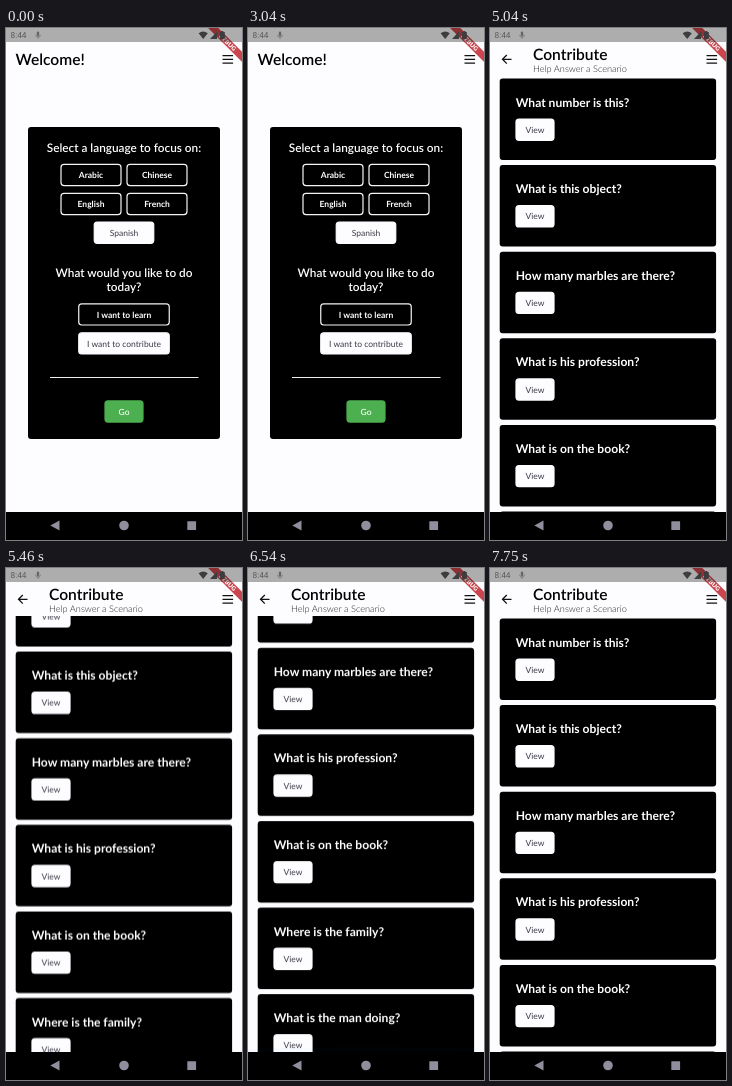
Write an HTML page that moves like this. It is 236 px wide and 512 px high and loops after 8000 ms.

```html
<!DOCTYPE html>
<html lang="en">
<head>
<meta charset="utf-8">
<title>Language app</title>
<style>
html, body { margin: 0; width: 100%; height: 100%; overflow: hidden; background: #fdfcff; }
svg { display: block; width: 236px; height: 512px; font-family: Lato, sans-serif; text-rendering: geometricPrecision; }
.mid { text-anchor: middle; }
.title { font-size: 15.6px; font-weight: 600; fill: #000; }
.subtitle { font-size: 9.2px; font-weight: 300; fill: #222; }
.ask { font-size: 11.8px; font-weight: 600; fill: #fff; }
.question { font-size: 12.1px; font-weight: 700; fill: #fff; }
.label { font-size: 8.5px; }
.line { fill: none; stroke: #111; stroke-width: 1.3; }
.page, .list, .glow { animation: 8s linear infinite; }
.page { animation-name: open; }
.list { animation-name: scroll; }
.glow { fill: #2a9fff; opacity: 0; }
.bottom { animation-name: glow-bottom; transform-origin: 118px 484px; }
.top { animation-name: glow-top; transform-origin: 118px 48px; }

@keyframes open {
  0%, 38.625% { opacity: 0; transform: translateY(128px); animation-timing-function: cubic-bezier(.4, 0, .2, 1); }
  42.375%, 100% { opacity: 1; transform: none; }
}
@keyframes scroll {
  0%, 65.625% { transform: none; animation-timing-function: cubic-bezier(.35, .25, .6, 1); }
  74.75%, 81.25% { transform: translateY(-168px); }
  83.875% { transform: translateY(-44.5px); }
  84.875%, 100% { transform: none; }
}
@keyframes glow-bottom {
  0%, 74.75% { opacity: 0; transform: scaleY(0); }
  76.6%, 77.8% { opacity: .14; transform: none; animation-timing-function: ease-out; }
  83.6%, 100% { opacity: 0; transform: scaleY(0); }
}
@keyframes glow-top {
  0%, 84.875% { opacity: 0; transform: scaleY(0); }
  86.75% { opacity: .14; transform: none; animation-timing-function: ease-out; }
  94.25%, 100% { opacity: 0; transform: scaleY(0); }
}
</style>
</head>
<body>
<svg viewBox="0 0 236 512">
  <defs>
    <path id="menu" class="line" d="M216.5 27.6h10.6M216.5 31.4h10.6M216.5 35.2h10.6"/>
  </defs>

  <g>
    <rect width="236" height="512" fill="#fdfcff"/>
    <text class="title" x="9.6" y="37.3">Welcome!</text>
    <use href="#menu"/>
    <rect x="22" y="99" width="192" height="312" rx="3"/>
    <g class="ask mid">
      <text x="118" y="124">Select a language to focus on:</text>
      <text x="118" y="249">What would you like to do</text>
      <text x="118" y="263.3">today?</text>
    </g>
    <g id="buttons"></g>
    <path d="M44 349.5h148.5" stroke="#eee"/>
  </g>

  <g class="page">
    <rect width="236" height="512" fill="#fdfcff"/>
    <g class="list" id="list"></g>
    <path class="glow bottom" d="M0 484V464Q118 438 236 464V484Z"/>
    <path class="glow top" d="M0 48V68Q118 94 236 68V48Z"/>
    <rect width="236" height="48" fill="#fdfcff"/>
    <path class="line" d="M21.5 31.3H12.8M16.8 27L12.5 31.3L16.8 35.6"/>
    <text class="title" x="43" y="32">Contribute</text>
    <text class="subtitle" x="43" y="44">Help Answer a Scenario</text>
    <use href="#menu"/>
  </g>

  <g transform="translate(236) rotate(45)">
    <rect x="-26" y="16.8" width="52" height="7.2" fill="#c22730" fill-opacity=".86"/>
    <text class="mid" y="22.6" font-size="6.1" font-weight="900" fill="#fff">DEBUG</text>
  </g>

  <rect width="236" height="14" fill="#0a0800" fill-opacity=".32"/>
  <text x="4.5" y="10.4" font-size="8.3" font-family="Roboto, sans-serif" fill="#595958">8:44</text>
  <g fill="#666">
    <rect x="30.8" y="3.6" width="2.4" height="4.6" rx="1.2"/>
    <path d="M29.6 6.8q0 2.4 2.4 2.4t2.4-2.4M32 9.2v1.6" fill="none" stroke="#666" stroke-width=".7"/>
  </g>
  <g fill="#3d3d40">
    <path d="M192.6 5.2Q197.2 1.6 201.8 5.2L197.2 11Z"/>
    <path d="M204 11L211 3.6V11Z"/>
    <path d="M214 4h1.4v-1h2v1h1.4v7h-4.8z"/>
  </g>

  <rect y="484" width="236" height="28"/>
  <g fill="#8e8e9c">
    <path d="M44.3 497.5L53.5 492.4V502.6Z"/>
    <circle cx="118" cy="497.5" r="4.8"/>
    <rect x="181.3" y="493.2" width="8.8" height="8.8" rx=".6"/>
  </g>
</svg>
<script>
const looks = {
  outline: { fill: '#000', stroke: '#f4f4f8', ink: '#fff', weight: 700 },
  solid: { fill: '#fdfcff', stroke: '#fdfcff', ink: '#3c3c48', weight: 400 },
  go: { fill: '#4caf50', stroke: '#4caf50', ink: '#fff', weight: 500 }
};

function button(text, centerX, centerY, width, look) {
  const { fill, stroke, ink, weight } = looks[look];
  return `<rect x="${centerX - width / 2}" y="${centerY - 10.6}" width="${width}" height="21.2" rx="3"
    fill="${fill}" stroke="${stroke}" stroke-width="1.2"/>
    <text class="label mid" x="${centerX}" y="${centerY + 3.1}" fill="${ink}" font-weight="${weight}">${text}</text>`;
}

function card(question, index) {
  return `<g transform="translate(0 ${50.5 + index * 86.6})">
    <rect x="9.7" width="216.4" height="81.5" rx="3"/>
    <text class="question" x="25.7" y="28">${question}</text>
    ${button('View', 45, 51.2, 38, 'solid')}</g>`;
}

document.getElementById('buttons').innerHTML = [
  ['Arabic', 85, 147, 60, 'outline'],
  ['Chinese', 151, 147, 60, 'outline'],
  ['English', 85, 176, 60, 'outline'],
  ['French', 151, 176, 60, 'outline'],
  ['Spanish', 118, 204.7, 59.5, 'solid'],
  ['I want to learn', 118, 286.4, 90.5, 'outline'],
  ['I want to contribute', 118, 315.4, 90.5, 'solid'],
  ['Go', 118, 383.5, 38, 'go']
].map(args => button(...args)).join('');

document.getElementById('list').innerHTML = [
  'What number is this?',
  'What is this object?',
  'How many marbles are there?',
  'What is his profession?',
  'What is on the book?',
  'Where is the family?',
  'What is the man doing?'
].map(card).join('');
</script>
</body>
</html>
```
